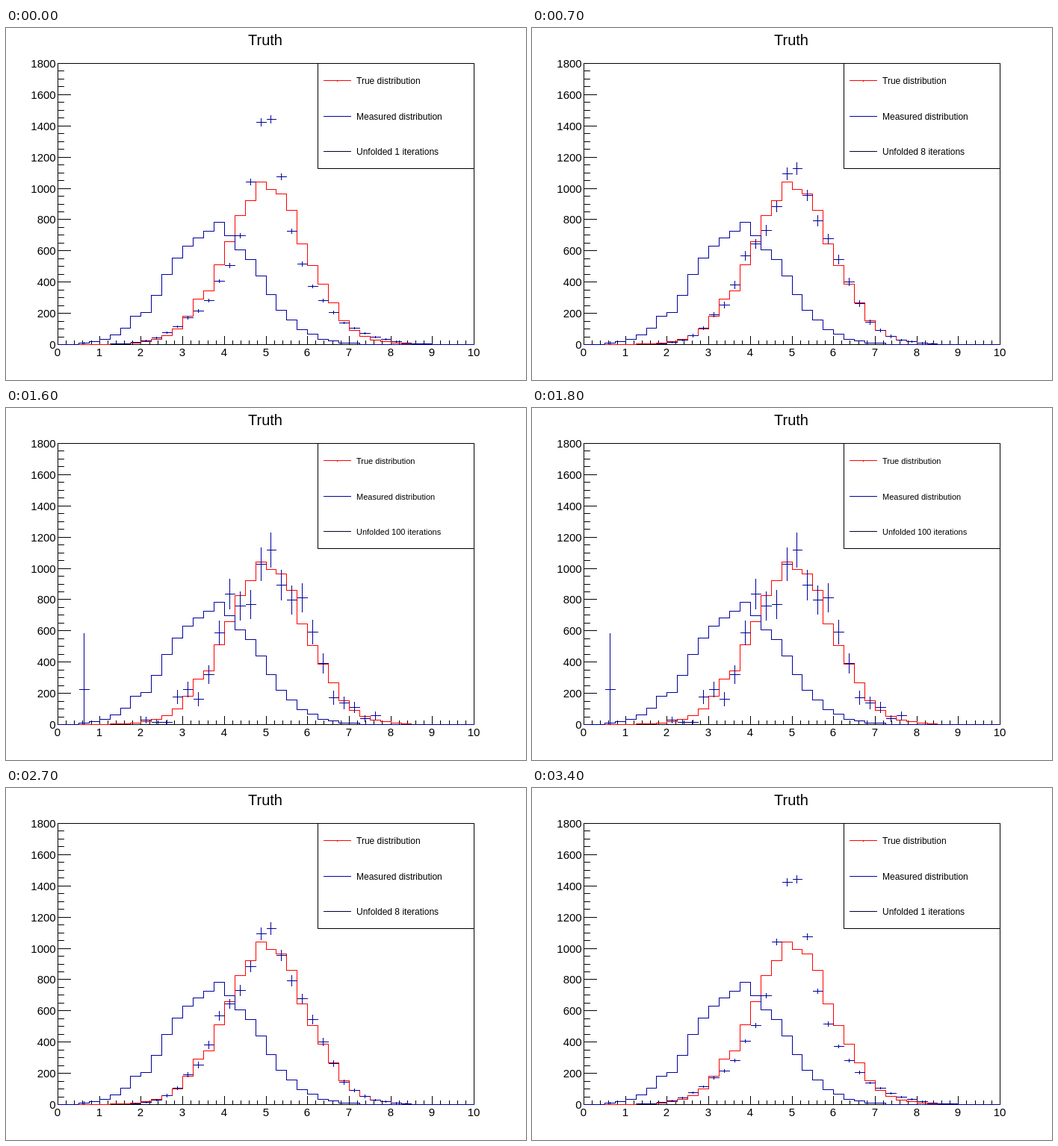
An HTML page for the animation above (3500 ms loop, 696 by 472 pixels).

```html
<!DOCTYPE html>
<html lang="en">
<head>
<meta charset="utf-8">
<title>Unfolding iterations</title>
<style>
  html, body { margin: 0; width: 100%; height: 100%; overflow: hidden; background: #fff; }
  svg { display: block; font-family: "Liberation Sans", Arial, sans-serif; }
  path, rect { fill: none; stroke: #000; stroke-width: 1; shape-rendering: crispEdges; }
  .true { stroke: #f00; }
  .measured, .unfolded { stroke: #000099; }
</style>
</head>
<body>
<svg id="stage" width="696" height="472" viewBox="0 0 696 472">
  <clipPath id="plot"><rect x="69" y="47" width="558" height="378"/></clipPath>
  <text x="347" y="23" font-size="20" text-anchor="middle">Truth</text>
  <rect x="69.5" y="47.5" width="557" height="377"/>
  <path id="xTicks"/>
  <g id="xLabels" font-size="15" text-anchor="middle"></g>
  <path id="yTicks"/>
  <g id="yLabels" font-size="15" text-anchor="end"></g>
  <g clip-path="url(#plot)">
    <path id="true" class="true"/>
    <path id="measured" class="measured"/>
    <path id="unfolded" class="unfolded"/>
  </g>
  <rect x="417.5" y="47.5" width="209" height="141" style="fill:#fff"/>
  <path class="true" d="M425 70.5H462M443.5 70V72"/>
  <path class="measured" d="M425 118.5H462"/>
  <path style="stroke:#000033" d="M425 165.5H462"/>
  <g id="legend">
    <text x="469" y="75">True distribution</text>
    <text x="469" y="123">Measured distribution</text>
    <text x="469" y="170" id="count"></text>
  </g>
</svg>
<script>
const LEFT = 69, TOP = 47, BOTTOM = 424, WIDTH = 557, BINS = 40;
const HEIGHT = BOTTOM - TOP;
const STEP_MS = 100, LAST_STEP = 34;
const COUNTS = [1, 2, 3, 4, 5, 6, 7, 8, 9, 10, 12, 14, 16, 20, 30, 50, 100, 1000];
const UNIT = 1800 / HEIGHT; // events per unit of bin height

const byId = id => document.getElementById(id);
const truth = { first: 5, h: [1, 1, 2, 4, 7, 12, 21, 38, 61, 72, 107, 138, 173, 193, 218, 208,
  202, 180, 135, 106, 81, 56, 32, 19, 11, 6, 4, 2, 1] };
const measured = { first: 2, h: [2, 4, 7, 13, 22, 38, 43, 66, 94, 116, 132, 143, 152, 164, 146,
  127, 114, 92, 67, 46, 33, 20, 14, 7, 5, 2, 2] };

// Unfolded heights from bin 2 on; spread is the error per square root of height
const FIRST = 2;
const keys = [
  { n: 1, spread: .27, edge: 1, h: [2, 0, 0, 1, 1, 3, 5, 9, 16, 24, 36, 45, 59, 85, 106, 146, 218,
    298, 302, 225, 152, 108, 78, 59, 43, 29, 22, 15, 10, 7, 4, 2, 1, 1] },
  { n: 8, spread: .53, edge: 2, h: [2, 0, 0, 0, 0, 1, 3, 6, 12, 22, 40, 53, 80, 119, 135, 153, 185,
    229, 236, 200, 166, 142, 114, 84, 55, 30, 19, 11, 6, 4, 2, 1, 0, 0] },
  { n: 16, spread: .69, edge: 5, h: [3, 0, 0, 0, 0, 1, 3, 6, 11, 24, 39, 48, 78, 124, 146, 158, 181,
    219, 227, 197, 170, 151, 119, 84, 51, 28, 19, 10, 7, 3, 2, 1, 0, 0] },
  { n: 100, spread: 1.48, edge: 75, h: [47, 0, 0, 0, 0, 0, 6, 3, 3, 37, 47, 34, 67, 123, 175, 159,
    161, 215, 234, 187, 167, 170, 124, 82, 36, 29, 23, 8, 12, 0, 0, 0, 0, 0] }
];

const binX = i => LEFT + Math.round(i * WIDTH / BINS) + .5;

function scaleFor(n) {
  const axis = n > 100
    ? { min: -500, max: 2000, major: 500, minor: 100 }
    : { min: 0, max: 1800, major: 200, minor: 50 };
  axis.y = v => Math.round(BOTTOM - (v - axis.min) / (axis.max - axis.min) * HEIGHT) + .5;
  return axis;
}

function unfold(n) {
  let k = 0;
  while (k < keys.length - 2 && n > keys[k + 1].n) k++;
  const a = keys[k], b = keys[k + 1];
  const t = (a.n ** -.5 - n ** -.5) / (a.n ** -.5 - b.n ** -.5);
  const mix = (p, q) => p + (q - p) * t;
  const spread = mix(a.spread, b.spread), edge = mix(a.edge, b.edge);
  return a.h.map((p, i) => {
    const h = Math.max(0, mix(p, b.h[i]));
    return { h, err: i ? spread * Math.sqrt(h) : edge };
  });
}

function stairs({ first, h }, y) {
  let d = `M${binX(0)} ${y(0)}`;
  for (let i = 0; i < BINS; i++) d += `V${y((h[i - first] || 0) * UNIT)}H${binX(i + 1)}`;
  return d;
}

function crosses(points, y) {
  return points.map(({ h, err }, i) => {
    if (h < .5) return "";
    const bin = i + FIRST;
    return `M${binX(bin)} ${y(h * UNIT)}H${binX(bin + 1)}` +
      `M${binX(bin + .5)} ${y((h + err) * UNIT) - .5}V${y((h - err) * UNIT) + .5}`;
  }).join("");
}

function drawXAxis() {
  let ticks = "", labels = "";
  for (let i = 0; i <= 50; i++) {
    const x = LEFT + Math.round(i * WIDTH / 50) + .5;
    ticks += `M${x} ${BOTTOM}v${i % 5 ? -5 : -11}`;
    if (i % 5 === 0) labels += `<text x="${x - .5}" y="440">${i / 5}</text>`;
  }
  byId("xTicks").setAttribute("d", ticks);
  byId("xLabels").innerHTML = labels;
}

function drawYAxis({ min, max, major, minor, y }) {
  let ticks = "", labels = "";
  for (let v = min; v <= max; v += minor) {
    const isMajor = v % major === 0;
    ticks += `M${LEFT} ${y(v)}h${isMajor ? 18 : 9}`;
    if (isMajor) labels += `<text x="66.7" y="${y(v) + 5}">${String(v).replace("-", "\u2212")}</text>`;
  }
  byId("yTicks").setAttribute("d", ticks);
  byId("yLabels").innerHTML = labels;
}

function draw(n) {
  const axis = scaleFor(n);
  drawYAxis(axis);
  byId("true").setAttribute("d", stairs(truth, axis.y));
  byId("measured").setAttribute("d", stairs(measured, axis.y));
  byId("unfolded").setAttribute("d", crosses(unfold(n), axis.y));
  byId("legend").setAttribute("font-size", n < 100 ? 12 : 11);
  byId("count").textContent = `Unfolded ${n} iterations`;
}

let shown = 0;
function update(ms) {
  const step = Math.floor(ms / STEP_MS) % (LAST_STEP + 1);
  const n = COUNTS[Math.min(step, LAST_STEP - step)];
  if (n !== shown) draw(shown = n);
}

drawXAxis();
update(0);
const start = performance.now();
function tick() {
  update(performance.now() - start);
  requestAnimationFrame(tick);
}
requestAnimationFrame(tick);
</script>
</body>
</html>
```
